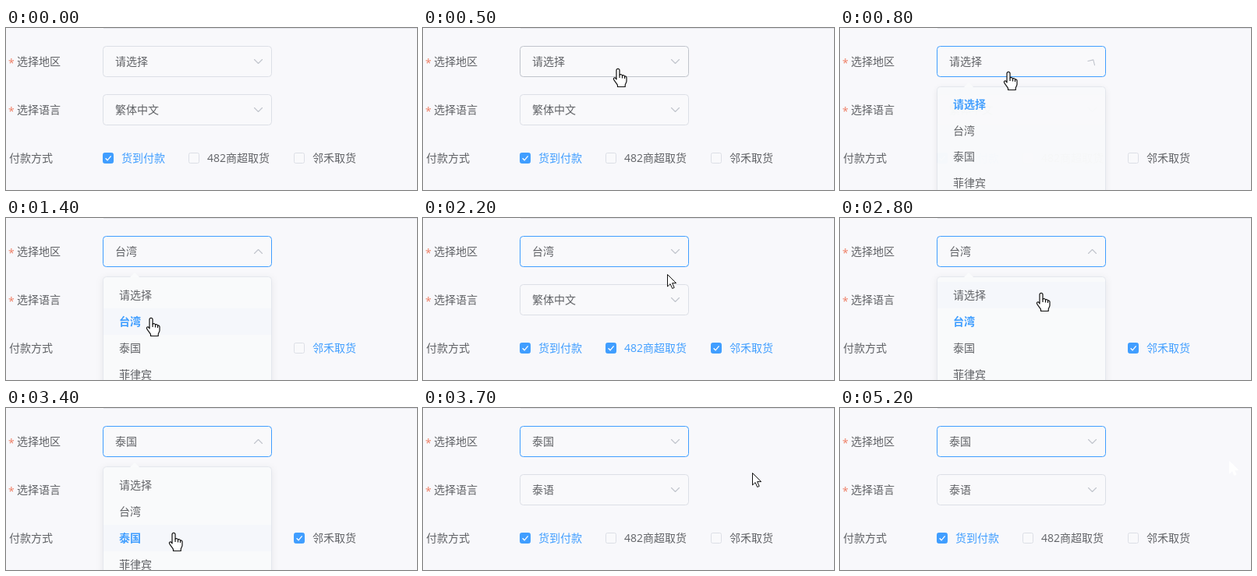
An HTML page that plays this animation: 527x208 px, repeating every 5500 ms.

```html
<!DOCTYPE html>
<html lang="zh-CN">
<head>
<meta charset="utf-8">
<title>Linked form fields</title>
<style>
html, body { margin: 0; width: 100%; height: 100%; overflow: hidden; background: #f8f8fb; }
svg { display: block; }
text { font: 14px "Open Sans", "Noto Sans CJK SC", "Noto Sans CJK", sans-serif; fill: #606266; }
.field { fill: #f9f9fb; stroke: #dcdfe6; }
.chevron { fill: none; stroke: #c0c4cc; stroke-width: 1.1; stroke-linecap: round; stroke-linejoin: round; }
.star { fill: #ee7f66; }
</style>
</head>
<body>
<svg id="stage" width="527" height="208" viewBox="0 0 527 208"></svg>
<script>
const LOOP = 5500, STEP = 100;
const BLUE = '#409eff', GRAY = '#606266';
const REGIONS = ['请选择', '台湾', '泰国', '菲律宾'];
const LANGUAGES = ['繁体中文', '繁体中文', '泰语'];
const OPENS = [[635, 1440], [2400, 3440]];
const MENU_TOP = 75, ROW_TOP = 82, ROW_H = 34;

// time, x, y of the pointer tip
const PATH = [
  [100, 497, 10], [300, 400, 36], [500, 250, 52], [600, 220, 56], [800, 216, 56],
  [1000, 208, 84], [1200, 190, 120], [1400, 186, 128], [1500, 205, 120],
  [1700, 316, 75], [2100, 316, 75], [2200, 313, 72], [2400, 300, 50],
  [2500, 292, 56], [2800, 258, 96], [3000, 236, 132], [3200, 215, 160],
  [3400, 215, 160], [3500, 255, 146], [3700, 422, 83], [4900, 422, 83], [5200, 499, 68]
];

const stage = document.getElementById('stage');

function set(node, attrs) {
  for (const key in attrs) node.setAttribute(key, attrs[key]);
  return node;
}

function add(parent, tag, attrs, content) {
  const node = set(document.createElementNS('http://www.w3.org/2000/svg', tag), attrs);
  if (content) node.textContent = content;
  return parent.appendChild(node);
}

// Text centred vertically on y
const label = (parent, x, y, content) => add(parent, 'text', { x, y: y + 5 }, content);

function select(y) {
  const box = add(stage, 'rect', { class: 'field', x: 124.5, y: y - 19.5, width: 216, height: 39, rx: 4 });
  const text = label(stage, 140, y, '');
  const chevron = add(stage, 'path', { class: 'chevron', d: 'M-5-2.5L0 2.5L5-2.5', transform: `translate(323.5 ${y})` });
  return { box, text, chevron };
}

function checkbox(x, content) {
  const box = add(stage, 'rect', { x: x + .5, y: 160.5, width: 13, height: 13, rx: 2 });
  const tick = add(stage, 'path', { d: `M${x + 3.6} 167.2l2.5 2.6 4.5-5.4`, fill: 'none', stroke: '#fff', 'stroke-width': 1.3 });
  return { box, tick, text: label(stage, x + 24, 167, content) };
}

add(stage, 'path', { d: 'M125 .5H527', stroke: '#e2e4ea' });
add(stage, 'text', { class: 'star', x: 3, y: 50 }, '*');
add(stage, 'text', { class: 'star', x: 3, y: 112 }, '*');
label(stage, 14, 43, '选择地区');
label(stage, 14, 105, '选择语言');
label(stage, 4, 167, '付款方式');

const region = select(43);
const language = select(105);
const checks = [checkbox(124, '货到付款'), checkbox(234, '482商超取货'), checkbox(369, '邻禾取货')];

const menu = add(stage, 'g', {});
add(menu, 'rect', {
  x: 124.5, y: 75.5, width: 216, height: 190, rx: 4, fill: '#f9fafb', stroke: '#e4e7ed',
  style: 'filter:drop-shadow(0 2px 5px rgba(0,0,0,.07))'
});
add(menu, 'path', { d: 'M159 76L165 70L171 76Z', fill: '#fafbfc' });
const hover = add(menu, 'rect', { x: 125, width: 215, height: ROW_H, fill: '#f5f7fb' });
const rows = REGIONS.map((name, i) => label(menu, 145, ROW_TOP + ROW_H * (i + .5), name));

const pointer = add(stage, 'g', { 'stroke-linejoin': 'round' });
const arrow = add(pointer, 'path', { d: 'M.5.5V16l3.6-3.4 2.6 5.9 2.5-1.1-2.6-5.8h5z', fill: '#fff' });
const hand = add(pointer, 'g', { fill: '#fff', stroke: '#111', 'stroke-width': 1.2 });
add(hand, 'path', {
  d: 'M-2 14V2.4a2 2 0 0 1 4 0V8c1.8-.9 3.3-.2 3.5.9 1.5-.7 2.8 0 3 1.1 1.4-.5 2.5.3 2.5 1.8v4.4c0 2-1.8 3.4-1.8 5.3v2H-.5v-2c-1-2.2-4.6-5.8-5.1-7.8-.4-1.6 1.5-2.4 2.7-1.2z'
});
add(hand, 'path', { d: 'M2 8v4M5.5 9v3.5M8.5 10v3', fill: 'none' });

const clamp = v => Math.max(0, Math.min(1, v));
const easeOut = v => 1 - (1 - clamp(v)) ** 5;
const smooth = v => 1 - (1 - clamp(v)) ** 2.2;

// How far the menu is open, 0 to 1
function openness(t, ease) {
  const [from, to] = t < 2000 ? OPENS[0] : OPENS[1];
  return ease((t - from) / 300) - ease((t - to) / 260);
}

function tipAt(t) {
  const next = PATH.findIndex(p => p[0] > t);
  if (next < 0) return PATH[PATH.length - 1].slice(1);
  if (next === 0) return PATH[0].slice(1);
  const [t0, x0, y0] = PATH[next - 1], [t1, x1, y1] = PATH[next];
  const k = (t - t0) / (t1 - t0);
  return [Math.round(x0 + (x1 - x0) * k), Math.round(y0 + (y1 - y0) * k)];
}

const show = (node, on) => set(node, { visibility: on ? 'visible' : 'hidden' });

function render(t) {
  const chosen = t < 1400 ? 0 : t < 3400 ? 1 : 2;
  const [x, y] = tipAt(t);
  const open = openness(t, easeOut);
  const inColumn = x >= 124 && x < 341;
  const onField = inColumn && y >= 23 && y < 63;
  const onMenu = inColumn && y >= ROW_TOP && open > .5;

  region.text.textContent = REGIONS[chosen];
  language.text.textContent = LANGUAGES[chosen];
  region.box.style.stroke = t >= 700 ? BLUE : onField ? '#c0c4cc' : '';
  set(region.chevron, { transform: `translate(323.5 43) rotate(${-180 * openness(t, smooth)})` });

  checks.forEach(({ box, tick, text }, i) => {
    const on = i === 0 || (t >= 1500 && t < 3500);
    const blue = i === 0 || chosen === 1;
    set(box, { fill: on ? BLUE : '#f9f9fb', stroke: on ? BLUE : '#dcdfe6' });
    show(tick, on);
    text.style.fill = blue ? BLUE : GRAY;
  });

  const visible = open > .02;
  menu.style.display = visible ? '' : 'none';
  set(menu, { opacity: open, transform: `translate(0 ${MENU_TOP * (1 - open)}) scale(1 ${open})` });
  hover.style.display = onMenu ? '' : 'none';
  set(hover, { y: ROW_TOP + ROW_H * Math.floor((y - ROW_TOP) / ROW_H) });
  rows.forEach((row, i) => {
    row.style.fill = i === chosen ? BLUE : GRAY;
    row.style.fontWeight = i === chosen ? 700 : 400;
  });

  const useHand = onField || onMenu;
  pointer.style.display = t >= 100 ? '' : 'none';
  set(pointer, { transform: `translate(${x} ${y})` });
  hand.style.display = useHand ? '' : 'none';
  arrow.style.display = useHand ? 'none' : '';
  set(arrow, { stroke: t >= 5200 ? '#fff' : '#111' });
}

function tick() {
  const t = performance.now() % LOOP;
  render(Math.floor(t / STEP) * STEP);
  requestAnimationFrame(tick);
}
tick();
</script>
</body>
</html>
```
